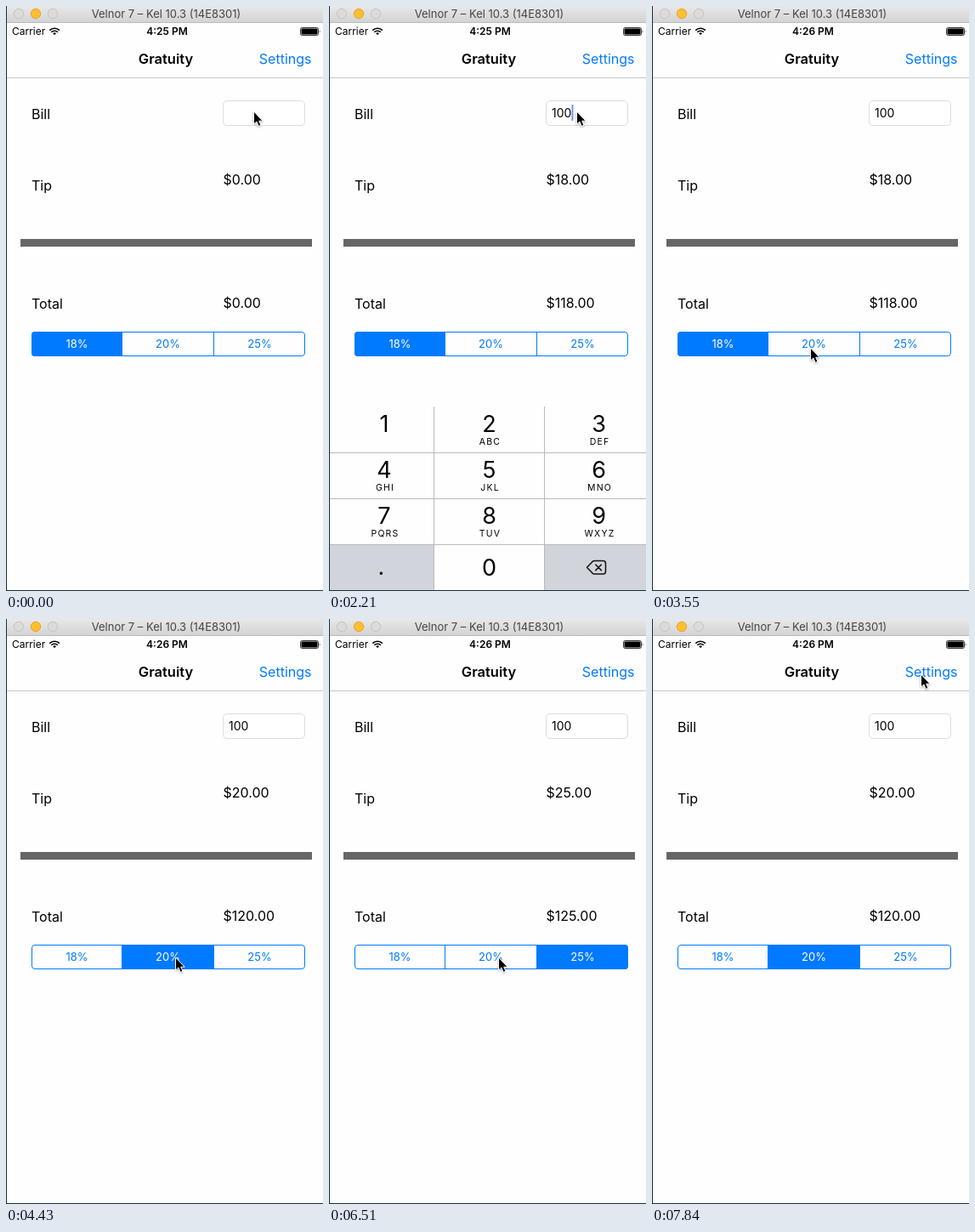
Animation of 373 by 688 pixels, one loop 8000 ms. Source, as an HTML page:

```html
<!DOCTYPE html>
<html lang="en">
<head>
<meta charset="utf-8">
<title>Gratuity</title>
<style>
  html, body { margin: 0; width: 373px; height: 688px; overflow: hidden; background: #fefefe; }
  svg { display: block; font-family: Inter, "Open Sans", sans-serif; font-size: 16px; }
  .mid { text-anchor: middle; }
  .bold { font-weight: 600; }
  .small { font-size: 12px; }
  .blue { fill: #007aff; }
  .digit { font-size: 27px; text-anchor: middle; }
  .letters { font-size: 10.5px; letter-spacing: 1.2px; text-anchor: middle; }
  .line { fill: none; stroke: #b9babd; }
</style>
</head>
<body>
<svg id="stage" width="373" height="688" viewBox="0 0 373 688">
  <defs>
    <linearGradient id="chrome" x1="0" y1="0" x2="0" y2="1">
      <stop offset="0" stop-color="#e9e8e9"/>
      <stop offset="1" stop-color="#d3d2d3"/>
    </linearGradient>
    <clipPath id="segClip"><rect x="30" y="383" width="322" height="29" rx="4"/></clipPath>
    <filter id="shadow" x="-50%" y="-50%" width="200%" height="200%">
      <feDropShadow dx="0" dy="1" stdDeviation="1" flood-opacity=".35"/>
    </filter>
  </defs>
  <rect width="373" height="688" fill="#fefefe"/>

  <rect width="373" height="20" fill="url(#chrome)"/>
  <path d="M0 19.5H373" stroke="#bdbcbd"/>
  <g stroke-width="1">
    <circle cx="15" cy="9" r="5.7" fill="#dcdbdc" stroke="#c6c5c6"/>
    <circle cx="35" cy="9" r="5.7" fill="#fdbe30" stroke="#e2a437"/>
    <circle cx="55" cy="9" r="5.7" fill="#dcdbdc" stroke="#c6c5c6"/>
  </g>
  <text class="mid" x="188.5" y="14" font-size="13" fill="#444">Velnor 7 – Kel 10.3 (14E8301)</text>

  <text class="small" x="7" y="34">Carrier</text>
  <g fill="none" stroke="#000" stroke-width="1.6">
    <path d="M51.3 28.6a8.2 8.2 0 0 1 11.6 0M53.3 30.8a5.4 5.4 0 0 1 7.6 0"/>
    <path d="M55.2 32.2a2.8 2.8 0 0 1 3.8 0L57.1 34Z" fill="#000" stroke="none"/>
  </g>
  <text class="mid small bold" id="clock" x="189.5" y="34"></text>
  <rect x="346.5" y="25.5" width="21" height="9" rx="2" fill="none" stroke="#000" stroke-width=".8"/>
  <rect x="347.5" y="26.5" width="19" height="7" rx="1"/>
  <path d="M368.8 28.2q1.4 1.8 0 3.6Z"/>

  <text class="mid bold" x="188" y="68" font-size="16.5">Gratuity</text>
  <text class="blue" x="359.5" y="68" text-anchor="end">Settings</text>
  <path d="M1 84.5H373" stroke="#c9c9c9"/>

  <text x="30" y="133">Bill</text>
  <text x="30" y="217">Tip</text>
  <text x="30" y="356">Total</text>
  <rect x="255.5" y="111.5" width="96" height="29" rx="4.5" fill="#fff" stroke="#dcdcdc"/>
  <text id="bill" x="262" y="131" font-size="14"></text>
  <rect id="caret" y="116" width="1.8" height="19" fill="#426bf2"/>
  <text id="tip" x="255.5" y="210"></text>
  <text id="total" x="255.5" y="355"></text>
  <rect x="17" y="274" width="343" height="9" fill="#666"/>

  <g id="segments" clip-path="url(#segClip)"></g>
  <path d="M136.5 383V412M244.5 383V412" stroke="#007aff"/>
  <rect x="30.5" y="383.5" width="321" height="28" rx="3.5" fill="none" stroke="#007aff"/>

  <g id="keyboard"></g>
  <path d="M.5 0V688M0 687.5H373" stroke="#12303a" fill="none"/>
  <path id="cursor" filter="url(#shadow)" stroke="#fff" stroke-width="1"
        d="M-.5-1V14L2.9 11 5.2 16.4 8 15.2 5.7 10.2H10.2Z"/>
</svg>
<script>
const LOOP = 8000, TICK = 148, LEAD = 16;
const RATES = [18, 20, 25];
const KEYBOARD_HEIGHT = 217;

const TYPED = [[0, ''], [7, '1'], [11, '10'], [12, '100']];
const CARET = [[0, 0], [1, 1], [4, .85], [5, 0], [7, 1], [8, .7], [9, 0], [11, 1], [15, .8], [16, .3], [17, 0], [18, 1], [20, 0]];
const CHOICE = [[0, 0], [28, 1], [38, 2], [46, 1]];
const CLOCK = [[0, '4:25 PM'], [18, '4:26 PM']];
const SHOW_AT = 1, HIDE_AT = 20;
const CURSOR = [
  [15, 292, 125], [19, 180, 338], [22, 180, 340], [24, 187, 403], [26, 190, 399],
  [29, 190, 399], [34, 290, 398], [41, 290, 398], [44, 200, 399], [47, 200, 399], [53, 317, 66]
];

const $ = id => document.getElementById(id);

function add(parent, tag, attrs, text = '') {
  const node = document.createElementNS('http://www.w3.org/2000/svg', tag);
  for (const name in attrs) node.setAttribute(name, attrs[name]);
  node.textContent = text;
  return parent.appendChild(node);
}

function entryAt(schedule, tick) {
  return schedule.filter(([start]) => start <= tick).pop();
}

function buildSegments() {
  const edges = [30, 136, 245, 352], centers = [83.5, 190.5, 298.5];
  return RATES.map((rate, i) => ({
    fill: add($('segments'), 'rect', { x: edges[i], y: 383, width: edges[i + 1] - edges[i], height: 29, fill: '#007aff' }),
    label: add($('segments'), 'text', { x: centers[i], y: 402, class: 'mid', 'font-size': 13 }, rate + '%')
  }));
}

function buildKeyboard() {
  const board = $('keyboard'), columns = [65, 188.5, 317.5];
  const letters = ['', 'ABC', 'DEF', 'GHI', 'JKL', 'MNO', 'PQRS', 'TUV', 'WXYZ'];
  add(board, 'rect', { x: 1, y: 471, width: 372, height: 217, fill: '#fefefe' });
  add(board, 'path', { d: 'M1 634H123V688H1ZM254 634H373V688H254Z', fill: '#d1d4db' });
  add(board, 'path', { d: 'M123.5 471V688M253.5 471V688M1 525.5H373M1 579.5H373M1 633.5H373', class: 'line' });
  letters.forEach((word, i) => {
    const x = columns[i % 3], y = 501 + 54 * Math.floor(i / 3);
    add(board, 'text', { x, y, class: 'digit' }, i + 1);
    add(board, 'text', { x: x + 1, y: y + 15, class: 'letters' }, word);
  });
  add(board, 'text', { x: 61.5, y: 669, class: 'digit' }, '.');
  add(board, 'text', { x: 188.5, y: 670, class: 'digit' }, '0');
  add(board, 'path', {
    d: 'M303.5 660.3L310 653.4Q311 652.5 312.5 652.5H322.5Q325.5 652.5 325.5 655.5V665Q325.5 668 322.5 668H312.5Q311 668 310 667.1ZM313.8 657L320.4 663.6M320.4 657L313.8 663.6',
    fill: 'none', stroke: '#111', 'stroke-width': 1.5, 'stroke-linejoin': 'round', 'stroke-linecap': 'round'
  });
}

// Critically damped spring: the share of the slide still to go.
function springLeft(ticks) {
  const x = 2.2 * Math.max(0, ticks), left = (1 + x) * Math.exp(-x);
  return left < .02 ? 0 : left;
}

function cursorAt(tick) {
  const next = CURSOR.findIndex(([at]) => at >= tick);
  if (next < 0) return CURSOR[CURSOR.length - 1].slice(1);
  if (next === 0) return CURSOR[0].slice(1);
  const [t0, x0, y0] = CURSOR[next - 1], [t1, x1, y1] = CURSOR[next];
  const u = (tick - t0) / (t1 - t0), eased = u * u * (3 - 2 * u);
  return [x0 + (x1 - x0) * eased, y0 + (y1 - y0) * eased];
}

function drawSegments(tick) {
  const [since, chosen] = entryAt(CHOICE, tick);
  const fading = since > 0 && tick === since;
  const previous = fading ? entryAt(CHOICE, tick - 1)[1] : -1;
  segments.forEach(({ fill, label }, i) => {
    const pressed = fading && i === chosen;
    const lit = i === previous || (i === chosen && !fading);
    fill.setAttribute('opacity', pressed ? .22 : i === previous ? .92 : lit ? 1 : 0);
    label.setAttribute('fill', lit ? '#fff' : '#007aff');
    label.setAttribute('opacity', pressed ? .6 : 1);
  });
  return RATES[chosen];
}

function draw(time) {
  const tick = Math.floor((time % LOOP + LEAD) / TICK);
  const typed = entryAt(TYPED, tick)[1], bill = Number(typed);
  const tip = bill * drawSegments(tick) / 100;

  $('clock').textContent = entryAt(CLOCK, tick)[1];
  $('bill').textContent = typed;
  $('tip').textContent = '$' + tip.toFixed(2);
  $('total').textContent = '$' + (bill + tip).toFixed(2);
  $('caret').setAttribute('x', 262.2 + (typed ? $('bill').getComputedTextLength() : 0));
  $('caret').setAttribute('opacity', entryAt(CARET, tick)[1]);

  const hidden = tick < HIDE_AT ? springLeft(tick - SHOW_AT) : 1 - springLeft(tick - HIDE_AT);
  $('keyboard').setAttribute('transform', `translate(0 ${Math.round(hidden * KEYBOARD_HEIGHT)})`);
  $('cursor').setAttribute('transform', `translate(${cursorAt(tick).map(Math.round)})`);
}

const segments = buildSegments();
buildKeyboard();
const start = performance.now();
function frame() {
  draw(performance.now() - start);
  requestAnimationFrame(frame);
}
frame();
</script>
</body>
</html>
```
